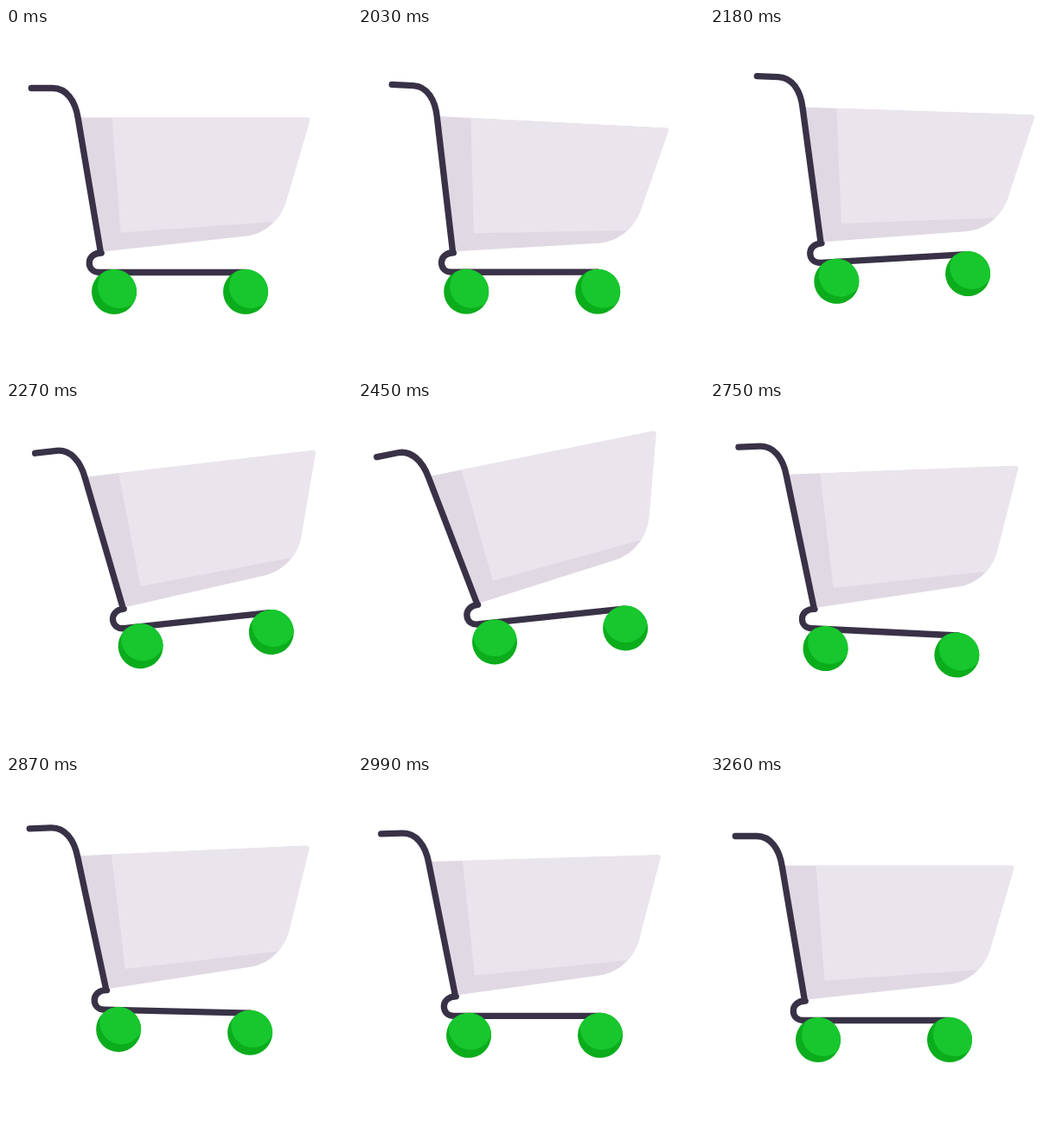
Animation, 400 px wide and 400 px high, one loop 3290 ms. Source, as an HTML page:

```html
<!DOCTYPE html>
<html lang="en">
<head>
<meta charset="utf-8">
<title>Cart hop</title>
<style>
  html, body { margin: 0; width: 100%; height: 100%; overflow: hidden; background: #fff; }
  svg { display: block; width: 100vw; height: 100vh; }
  .frame { fill: none; stroke: #393247; stroke-width: 7.3; stroke-linecap: round; stroke-linejoin: round; }
</style>
</head>
<body>
<svg viewBox="0 0 400 400">
  <defs>
    <path id="shell" d="M85 103H347.5Q352 103 351 107L323.5 201C317 220.5 301 236.5 279 240L112 258Z"/>
    <clipPath id="shellClip"><use href="#shell"/></clipPath>
    <clipPath id="wheelClip"><circle r="26"/></clipPath>
    <g id="wheel">
      <circle r="26" fill="#0bad1c"/>
      <circle cx="6" cy="-6" r="25" fill="#17c72d" clip-path="url(#wheelClip)"/>
    </g>
  </defs>
  <g id="cart">
    <path class="frame" d="M110.3 260C101.3 260 96.3 265.5 96.3 271.5C96.3 278 101 282.5 108 282.5H277"/>
    <g id="basket">
      <use href="#shell" y="0.4" fill="#e0d9e4"/>
      <g clip-path="url(#shellClip)" transform="translate(0 0.4)">
        <path fill="#eae5ec" d="M122.5 103H360V220L132.5 236Z"/>
      </g>
      <path class="frame" d="M29.3 69.5H54C70 69.5 80.3 84.5 83.3 104.5L109.3 258.5"/>
    </g>
    <g transform="translate(125 305)"><use class="spin" href="#wheel"/></g>
    <g transform="translate(277 305)"><use class="spin" href="#wheel"/></g>
  </g>
</svg>
<script>
const LOOP = 3290, START = 2030, STEP = 30;

const sway = u => (1 - Math.cos(Math.PI * u)) / 2;
const settle = u => 1 - (1 - u) ** 1.5;

// Swings from rest through each [time, value] turning point, then back to rest at `end`
function swing(t, begin, turns, end, lastEase = sway) {
  let [t0, from] = [begin, 0];
  for (const [t1, to] of [...turns, [end, 0]]) {
    if (t < t1) {
      const ease = t1 === end ? lastEase : sway;
      return from + (to - from) * ease(Math.max(0, (t - t0) / (t1 - t0)));
    }
    [t0, from] = [t1, to];
  }
  return 0;
}

const cart = document.getElementById('cart');
const basket = document.getElementById('basket');
const wheels = document.querySelectorAll('.spin');

function draw(ms) {
  const t = ms < START ? 0 : START + Math.floor((ms - START) / STEP) * STEP;
  const x = swing(t, 2015, [[2250, 19], [2590, 23]], 3130, settle);
  const y = swing(t, 2010, [[2390, -39]], 3200, settle);
  const tilt = swing(t, 2020, [[2360, -7.3], [2750, 2.8]], 2990);
  const lean = swing(t, 1965, [[2110, 7], [2410, -6.7], [2600, 5.6], [2750, -5]], 3150);
  const spin = swing(t, 2030, [[2480, -38], [2750, -15], [2980, -32]], 3240);

  cart.setAttribute('transform', `translate(${x} ${y}) rotate(${tilt} 200 200)`);
  basket.setAttribute('transform', `rotate(${lean} 110 258)`);
  for (const w of wheels) w.setAttribute('transform', `rotate(${spin})`);
}

const origin = performance.now();
function tick() {
  draw((performance.now() - origin) % LOOP);
  requestAnimationFrame(tick);
}
tick();
</script>
</body>
</html>
```
